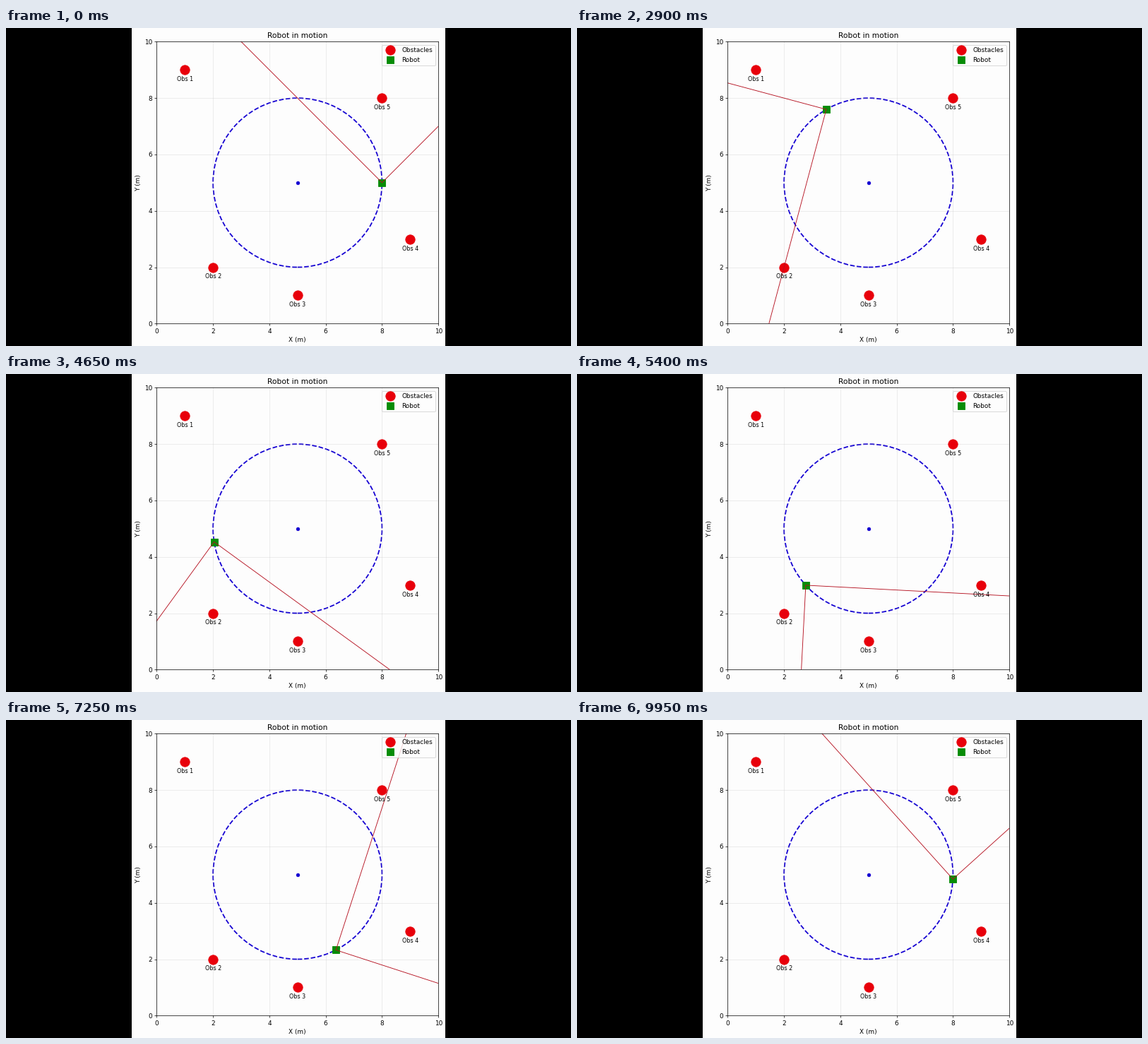
Write a matplotlib script that moves like this. It is 800x450 px and loops after 10000 ms.

```python
import numpy as np
import matplotlib.pyplot as plt
from matplotlib.animation import FuncAnimation
from matplotlib.patches import Circle, Rectangle

W, H, DPI = 800, 450, 64
FRAMES, INTERVAL = 200, 50

PAPER = "#fdfdfd"
RED, GREEN, BLUE, BEAM = "#e8000b", "#078c07", "#1400d2", "#b5101f"

CENTER, RADIUS = np.array([5.0, 5.0]), 3.0
OBSTACLES = [(1, 9), (2, 2), (5, 1), (9, 3), (8, 8)]
STEPS = 120            # poses in one lap
STEPS_PER_FRAME = 0.678
BEAM_LENGTH = 15

plt.rcParams["font.family"] = "DejaVu Sans"
fig = plt.figure(figsize=(W / DPI, H / DPI), dpi=DPI, facecolor="black")
fig.add_artist(Rectangle((178 / W, 0), 444 / W, 1, color=PAPER, lw=0, zorder=-1))

left, right, top, bottom = 213.4, 612.2, 19.4, 418.3
ax = fig.add_axes([left / W, 1 - bottom / H, (right - left) / W, (bottom - top) / H],
                  facecolor=PAPER)
ax.set(xlim=(0, 10), ylim=(0, 10), xlabel="X (m)", ylabel="Y (m)")
ax.set_title("Robot in motion")
ax.grid(True, alpha=0.3)

ax.add_patch(Circle(CENTER, RADIUS, fill=False, ec=BLUE, ls="--", lw=2))
ax.plot(*CENTER, "o", color=BLUE, ms=5)

ax.plot(*zip(*OBSTACLES), "o", color=RED, ms=15, label="Obstacles")
for i, (x, y) in enumerate(OBSTACLES, 1):
    ax.text(x, y - 0.4, f"Obs {i}", ha="center", fontsize=9)

robot, = ax.plot([], [], "s", color=GREEN, ms=12, label="Robot")
beams = [ax.plot([], [], color=BEAM, lw=1)[0] for _ in range(2)]
ax.legend(loc="upper right", facecolor=PAPER)


def polar(radius, angle):
    return radius * np.array([np.cos(angle), np.sin(angle)])


def update(frame):
    # The robot steps round one lap, then rests on the last pose.
    step = min(int(frame * STEPS_PER_FRAME + 0.8), STEPS - 1)
    angle = 2 * np.pi * step / STEPS
    pos = CENTER + polar(RADIUS, angle)
    robot.set_data([pos[0]], [pos[1]])
    for beam, turn in zip(beams, (np.pi / 4, 3 * np.pi / 4)):
        end = pos + polar(BEAM_LENGTH, angle + turn)
        beam.set_data([pos[0], end[0]], [pos[1], end[1]])
    return [robot, *beams]


anim = FuncAnimation(fig, update, frames=FRAMES, interval=INTERVAL,
                     repeat=True, repeat_delay=0)
plt.show()
```
